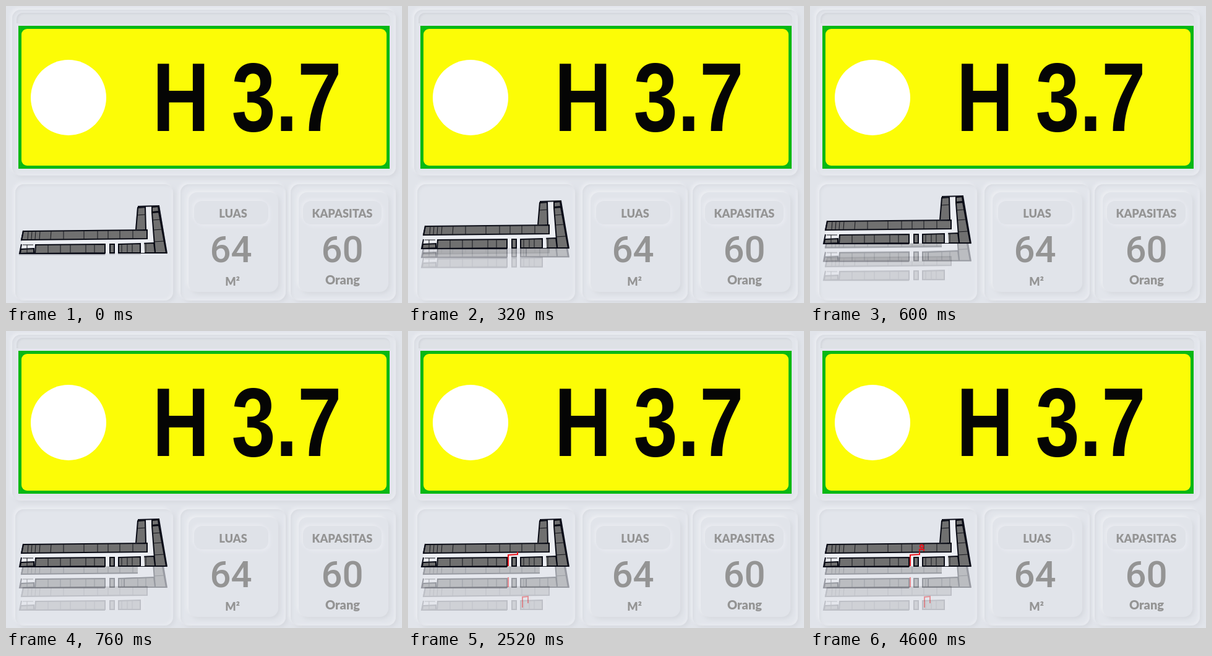
These frames come from a looping animation (640 px wide and 480 px high, 5120 ms). An HTML page:

```html
<!DOCTYPE html>
<html lang="id">
<head>
<meta charset="utf-8">
<title>H 3.7</title>
<style>
html, body { margin: 0; width: 100%; height: 100%; overflow: hidden; background: #e1e4ea; }
.stage { position: relative; width: 640px; height: 480px; overflow: hidden; background: #e1e4ea; }
.stage > * { position: absolute; box-sizing: border-box; }
.panel { border-radius: 14px; background: #e2e5eb; box-shadow: -3px -3px 5px #ebedf2, 3px 3px 6px #d6d9df, inset 2px 2px 4px #d9dce2, inset -2px -2px 4px #eaecf1; }
.inner { border-radius: 14px; background: #e1e4ea; box-shadow: -3px -3px 5px #eceef2, 3px 3px 6px #d5d8de; }
.pill { border-radius: 13px; background: #dfe2e8; box-shadow: -3px -3px 5px #e9ebf0, 3px 3px 5px #e8eaf0; }
.bar { background: #dee1e6; border-radius: 10px 10px 0 0; box-shadow: inset 2px 2px 3px #d3d6dc; }
.sign { left: 20px; top: 32px; width: 600px; height: 231px; background: #08b814; }
.sign::after { content: ""; position: absolute; inset: 5px; border-radius: 9px; background: #fcfc06; }
svg { left: 0; top: 0; }
.label { font: 900 18.2px Lato, sans-serif; }
.num { font: 500 60px Roboto, sans-serif; }
.info { fill: #949494; text-anchor: middle; }
.room { fill: #707070; stroke: #080a14; stroke-width: 2; }
.wall { stroke: #15161c; stroke-width: 1; fill: none; }
.route { fill: none; stroke: #e8141c; stroke-width: 2; }
.draw { stroke-dasharray: 1 2; }

.anim { animation: 5120ms linear infinite both; }
.top { animation-name: rise; }
.mid { animation-name: sink1; }
.low { animation-name: sink2; }
.r1 { animation-name: draw1; }
.r2 { animation-name: show2; }
.r3 { animation-name: draw3; }
.pin { animation-name: showPin; }
.top, .mid, .low { animation-timing-function: cubic-bezier(.4, .3, .7, .85); }
@keyframes rise { 0% { transform: translateY(19px); } 14.84%, 100% { transform: none; } }
@keyframes sink1 { 0% { transform: translateY(19px); } 14.84%, 100% { transform: translateY(34px); } }
@keyframes sink2 { 0% { transform: translateY(21px); } 14.84%, 100% { transform: translateY(70px); } }
@keyframes draw1 { 0%, 15.63% { stroke-dashoffset: 1.1; } 19.53%, 100% { stroke-dashoffset: 0; } }
@keyframes show2 { 0%, 38.27% { opacity: 0; } 38.28%, 47% { opacity: .8; } 49.2%, 100% { opacity: .45; } }
@keyframes draw3 { 0%, 39% { stroke-dashoffset: 1.1; } 49.2%, 100% { stroke-dashoffset: 0; } }
@keyframes showPin { 0%, 57.8% { opacity: 0; } 60.9%, 100% { opacity: 1; } }
</style>
</head>
<body>
<div class="stage">
  <div class="panel" style="left:10px;top:6px;width:620px;height:268px"></div>
  <div class="bar" style="left:17px;top:11px;width:604px;height:17px"></div>
  <div class="sign"></div>
  <div class="panel" style="left:15px;top:288px;width:255px;height:188px"></div>
  <div class="panel" style="left:282px;top:288px;width:170px;height:188px"></div>
  <div class="panel" style="left:460px;top:288px;width:170px;height:188px"></div>
  <div class="inner" style="left:295px;top:301px;width:145px;height:161px"></div>
  <div class="inner" style="left:473px;top:301px;width:145px;height:161px"></div>
  <div class="pill" style="left:304px;top:315px;width:120px;height:38px"></div>
  <div class="pill" style="left:480px;top:315px;width:127px;height:38px"></div>

  <svg width="640" height="480" viewBox="0 0 640 480">
    <defs>
      <g id="wing">
        <path fill="#eceef3" d="M211 343L214 305L247 303L261 380L213 381V343z"/>
        <path class="room" d="M213 307L225 306L226 343H210z"/>
        <path class="room" d="M236 315L247 314L259 380H241z"/>
        <path class="room" d="M191 366L239 364L241 380H191z"/>
        <path class="room" d="M236 306L246 305L247 313L236 314z"/>
        <path class="wall" d="M212 319L226 318M237 327L249 326M238 343L252 342M239 362L255 361M213 365V380M226 365V380"/>
        <path fill="none" stroke="#0c0e1a" stroke-width="2" d="M213 305L247 304L260 381"/>
      </g>
      <g id="block">
        <path fill="#eceef3" d="M28 344L222 342L224 380L22 381z"/>
        <path class="room" d="M28 345L228 343V357L25 359z"/>
        <path class="room" d="M48 367L160 366V380L47 381zM168 366H175V380H168zM182 366L217 365V380H182z"/>
        <path class="room" d="M24 374L45 373V380L23 381z"/>
        <path class="wall" d="M36 345L35 358M42 345L41 358M48 345L47 358M55 345L54 358M73 345L72 358M93 345V358M126 345V357M148 344V357M165 344V357M184 344V357M205 344V357M68 367V380M88 367V380M104 367V380M129 367V380M143 366V380M187 366V380M196 366V380M204 366V380M27 367H44M34 367V380"/>
        <path fill="none" stroke="#0c0e1a" stroke-width="2" d="M28 344L25 360M25 366L22 381H160"/>
      </g>
    </defs>

    <circle cx="101" cy="148" r="61" fill="#fff"/>
    <text transform="translate(236.5 202) scale(.81 1)" font-family="'Liberation Sans', Arial, sans-serif" font-weight="700" font-size="158" fill="#050505">H 3.7</text>

    <g class="info">
      <text class="label" x="367" y="342">LUAS</text>
      <text class="label" x="543.5" y="342">KAPASITAS</text>
      <text class="num" x="363.5" y="414">64</text>
      <text class="num" x="543.5" y="414">60</text>
      <text class="label" x="366" y="452">M²</text>
      <text class="label" x="544" y="450" style="font-size:20px">Orang</text>
    </g>

    <g class="anim low">
      <use href="#block" opacity=".17"/>
      <path class="route draw anim r1" pathLength="1" opacity=".4" d="M185 377V360L194 359V370"/>
    </g>
    <g class="anim mid">
      <g opacity=".34"><use href="#block"/><use href="#wing"/></g>
      <path class="route anim r2" d="M162 380V364"/>
    </g>
    <g class="anim top">
      <use href="#wing"/><use href="#block"/>
      <path class="route draw anim r3" pathLength="1" d="M162 380V362L177 361V357"/>
      <g class="anim pin">
        <circle class="route" cx="180.5" cy="348" r="2.6"/>
        <path class="route" d="M177 356V353H184V356"/>
      </g>
    </g>
  </svg>
</div>
</body>
</html>
```
